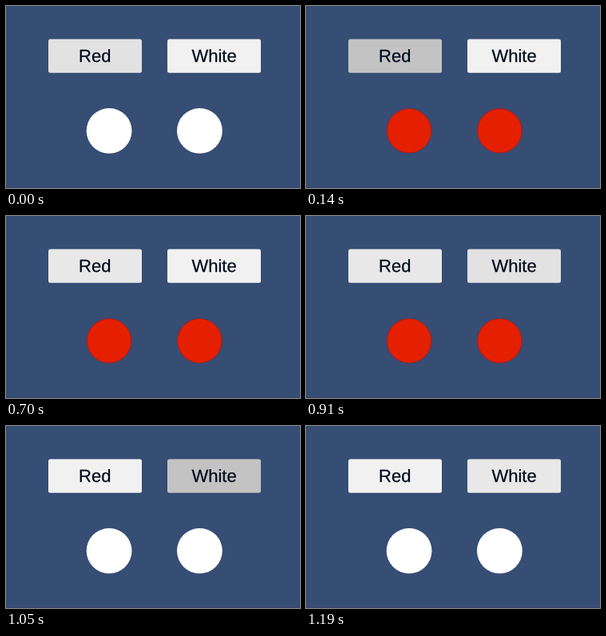
Animation, 368 px wide and 228 px high, one loop 1.26 s. Source, as an HTML page:

```html
<!DOCTYPE html>
<html>
<head>
<meta charset="utf-8">
<style>
  html, body { margin: 0; width: 100%; height: 100%; overflow: hidden; background: #364d74; }
  svg { display: block; }
  text {
    font: 22px "Liberation Sans", Arial, sans-serif;
    text-anchor: middle; text-rendering: geometricPrecision;
    fill: #020a1c; stroke: #020a1c; stroke-width: .25px;
  }
</style>
</head>
<body>
<svg width="368" height="228" viewBox="0 0 368 228">
  <rect width="368" height="228" fill="#364d74"/>
  <rect y="227" width="368" height="1" fill="#3a4468"/>
  <rect id="red" x="53" y="41.5" width="117" height="42.3" rx="2.5"/>
  <rect id="white" x="202" y="41.5" width="117" height="42.3" rx="2.5"/>
  <text x="111.3" y="70.4">Red</text>
  <text x="260.6" y="70.4">White</text>
  <g id="lamps">
    <circle cx="129.1" cy="156.4"/>
    <circle cx="242.4" cy="156.4"/>
  </g>
</svg>
<script>
  const STEP = 70, LOOP = 1260, WHITE_PRESS = 910, RELEASE = 140;
  const $ = id => document.getElementById(id);
  const red = $('red'), white = $('white'), lamps = $('lamps');

  const ramp = (t, from, to) => Math.min(1, Math.max(0, (t - from) / (to - from)));

  // Grey level at time t after the press: hover, press, release
  const press = t => 241 - 9 * ramp(t, -210, -70) - 37 * ramp(t, -25, 125)
    + 37 * ramp(t, RELEASE, 2 * RELEASE);

  const shade = (button, level) => button.setAttribute('fill', `rgb(${level},${level},${level})`);

  function draw() {
    const t = Math.floor(performance.now() % LOOP / STEP) * STEP;
    const cleared = t >= WHITE_PRESS + RELEASE;
    const lit = t >= RELEASE && !cleared;
    shade(red, cleared ? 241 : press(t));
    shade(white, press(t - WHITE_PRESS));
    lamps.setAttribute('fill', lit ? '#e42000' : '#fff');
    lamps.setAttribute('stroke', lit ? '#ac1a20' : 'none');
    for (const c of lamps.children) c.setAttribute('r', lit ? 27.7 : 28.4);
    requestAnimationFrame(draw);
  }
  draw();
</script>
</body>
</html>
```
